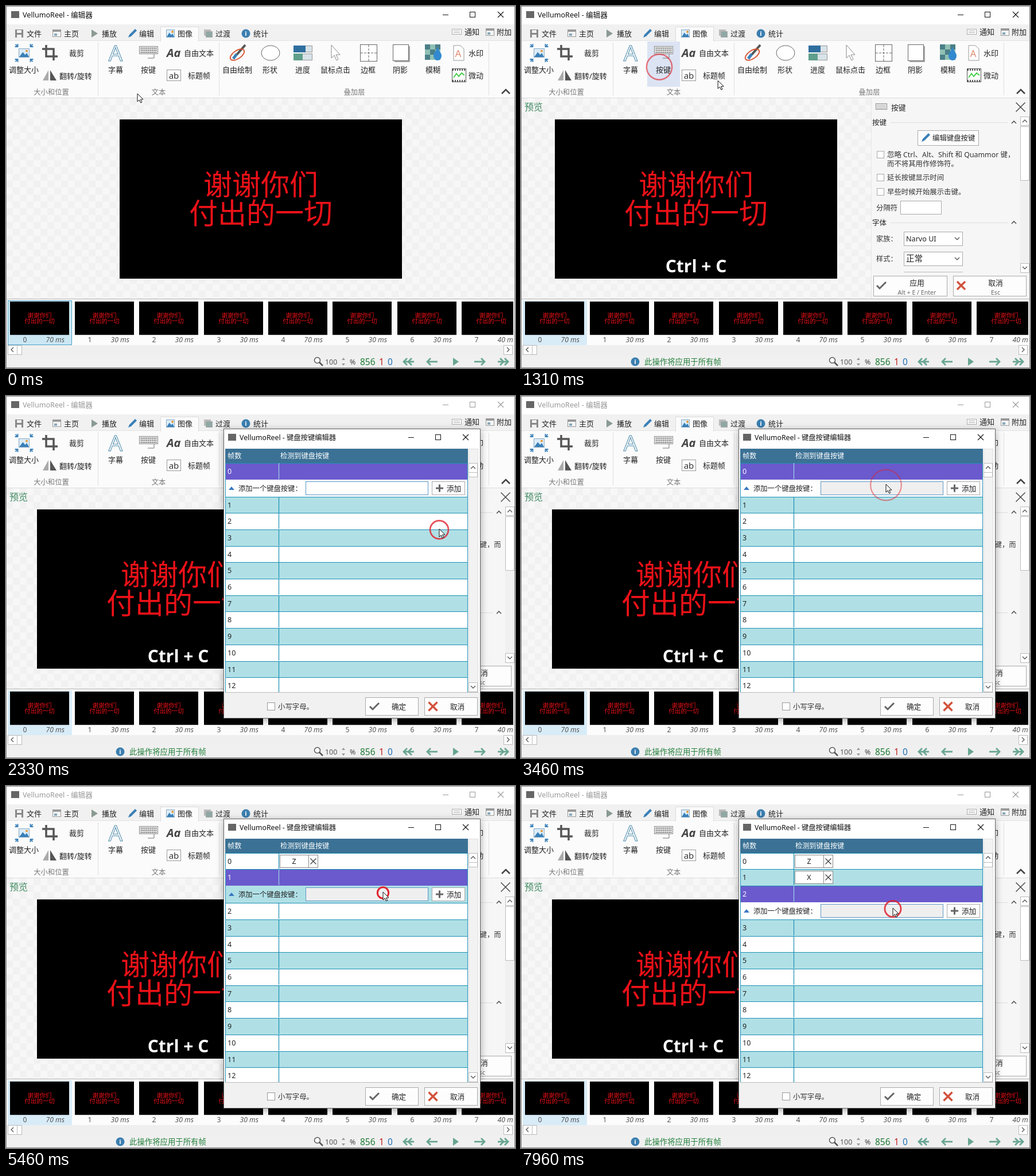
An HTML page with a canvas that plays this animation: 887x632 px, repeating every 8 s.

```html
<!DOCTYPE html>
<html lang="zh-CN">
<head>
<meta charset="utf-8">
<style>
html, body { margin: 0; width: 100%; height: 100%; overflow: hidden; background: #fff; }
canvas { display: block; width: 100%; height: 100%; }
</style>
</head>
<body>
<canvas id="stage" width="887" height="632"></canvas>
<script>
const screenCtx = document.getElementById('stage').getContext('2d');
const layer = document.createElement('canvas');
layer.width = 887; layer.height = 632;
const layerCtx = layer.getContext('2d');
let ctx = screenCtx;

const FONT = '"Noto Sans","Noto Sans CJK SC","Noto Sans CJK",sans-serif';
const APP = 'VellumoReel';
const LOOP = 8000, TEAL = '#68a592', BLUE = '#3a80b8', GREY = '#777';
const clamp = p => Math.max(0, Math.min(1, p));
const smooth = p => p * p * (3 - 2 * p);

// drawing helpers: text is placed by its vertical centre
function text(s, x, y, size = 12.8, color = '#222', align = 'left', style = '') {
  ctx.font = `${style} ${size}px ${FONT}`;
  ctx.fillStyle = color;
  ctx.textAlign = align;
  ctx.fillText(s, x, y + size * 0.37);
}
const label = (s, x, y, size, color, style) => text(s, x, y, size, color, 'center', style);
function box(x, y, w, h, fill, stroke, lw = 1) {
  if (fill) { ctx.fillStyle = fill; ctx.fillRect(x, y, w, h); }
  if (stroke) { ctx.strokeStyle = stroke; ctx.lineWidth = lw; ctx.strokeRect(x + .5, y + .5, w - 1, h - 1); }
}
function path(points, color, lw = 1, fill) {
  ctx.beginPath();
  for (let i = 0; i < points.length; i += 2) ctx.lineTo(points[i], points[i + 1]);
  if (fill) { ctx.closePath(); ctx.fillStyle = fill; ctx.fill(); }
  if (color) { ctx.strokeStyle = color; ctx.lineWidth = lw; ctx.stroke(); }
}
function oval(x, y, rx, ry, fill, stroke, lw = 1) {
  ctx.beginPath();
  ctx.ellipse(x, y, rx, ry, 0, 0, 7);
  if (fill) { ctx.fillStyle = fill; ctx.fill(); }
  if (stroke) { ctx.strokeStyle = stroke; ctx.lineWidth = lw; ctx.stroke(); }
}
function clipped(x, y, w, h, draw) {
  ctx.save();
  ctx.beginPath(); ctx.rect(x, y, w, h); ctx.clip();
  draw();
  ctx.restore();
}
function cross(x, y, r, color, lw = 1.2) {
  path([x - r, y - r, x + r, y + r], color, lw);
  path([x + r, y - r, x - r, y + r], color, lw);
}
const chevron = (x, y, dx, dy, color = '#555', lw = 1.3) =>
  path(dx ? [x - dx, y - 4, x + dx, y, x - dx, y + 4] : [x - 4, y - dy, x, y + dy, x + 4, y - dy], color, lw);
const tick = (x, y) => path([x - 8, y, x - 3, y + 5, x + 8, y - 6], '#666', 3);
const pencil = (x, y) => {
  path([x - 7, y + 7, x - 5, y + 2, x + 5, y - 8, x + 8, y - 5, x - 2, y + 5], null, 0, BLUE);
};
function info(x, y) {
  oval(x, y, 7.5, 7.5, '#3c7fb0');
  text('i', x, y, 11, '#fff', 'center', 'bold');
}
function picture(x, y, w, h) {
  box(x, y, w, h, '#dcecf8', '#88a9c4');
  path([x + 1, y + h - 1, x + w * .38, y + h * .4, x + w * .6, y + h * .7, x + w * .75, y + h * .5, x + w - 1, y + h - 1], null, 0, BLUE);
  oval(x + w * .74, y + h * .28, 2, 2, '#e59a35');
}
function frameIcon(x, y) {
  box(x - 7, y - 7, 15, 13, '#f4f4f4', '#999');
  box(x - 7, y - 7, 15, 4, '#999');
  box(x - 4, y, 5, 4, '#8ab');
}
function keyboard(x, y, w, h) {
  box(x, y, w, h, '#f6f6f6', '#888');
  const n = w > 25 ? 9 : 7, step = (w - 4) / n;
  for (let r = 0; r < 3; r++)
    for (let i = 0; i < n; i++) box(x + 2.5 + i * step, y + 2.5 + r * (h - 3) / 3, step - 1, (h - 6) / 3 - .5, '#777');
}
function windowButtons(xs, y, color) {
  path([xs[0] - 5, y + .5, xs[0] + 5, y + .5], color);
  box(xs[1] - 5, y - 5, 10, 10, null, color);
  cross(xs[2], y, 5, color, 1.1);
}
function scrollBox(x, y, w, h) { box(x, y, w, h, '#fff', '#bbb'); }
function slide(x, y, w) {
  const k = w / 492;
  box(x, y, w, 278 * k, '#000');
  label('谢谢你们', x + 246 * k, y + 113.5 * k, 50 * k, '#ec1118', '500');
  label('付出的一切', x + 246 * k, y + 163.5 * k, 50 * k, '#ec1118', '500');
}

// timeline
const moves = [ // start, end, x, y
  [0, 0, 229, 153], [250, 520, 241, 105], [1115, 1800, 755, 232], [2430, 2830, 636, 154],
  [3970, 4280, 771, 159], [4700, 4980, 657, 185], [6090, 6350, 771, 186], [6800, 7300, 648, 213]];
const clicks = [ // press, release
  [770, 890], [2000, 2110], [2830, 2890], [4450, 4570], [5040, 5080], [5360, 5440], [6600, 6700], [7680, 7800]];

function pointer(t) {
  let [, , x, y] = moves[0];
  for (const [from, to, nx, ny] of moves.slice(1)) {
    const p = smooth(clamp((t - from) / (to - from)));
    x += (nx - x) * p;
    y += (ny - y) * p;
  }
  return { x, y };
}

function drawRing(t) {
  const click = clicks.filter(c => c[0] <= t).pop();
  if (!click) return;
  const p = Math.max(0, (t - click[1]) / 800);
  if (p >= 1) return;
  const at = pointer(click[0]);
  ctx.globalAlpha = 1 - .75 * p;
  oval(at.x, at.y + 1.5, 9 + 25 * p, 9 + 25 * p, null, '#e0202a', 3 - p);
  ctx.globalAlpha = 1;
}
function drawPointer({ x, y }) {
  path([x, y, x, y + 14, x + 3.3, y + 11, x + 5.6, y + 16, x + 7.8, y + 15, x + 5.6, y + 10.2, x + 10, y + 10, x, y], '#111', 1, '#fff');
}

function drawTabs(active) {
  box(0, 0, 887, 32, '#fff');
  box(9, 9, 14, 12, '#666');
  text(APP + ' - 编辑器', 29, 15.5, 12.6, active ? '#111' : '#999');
  windowButtons([766, 813, 862], 15, active ? '#111' : '#999');
  box(0, 32, 887, 29, '#f1f1f1');
  box(0, 60, 887, 101, '#fbfbfb');
  path([0, 60.5, 887, 60.5], '#e2e2e2');
  box(269, 36, 67, 26, '#fbfbfb', '#dcdcdc');
  box(270, 58, 65, 6, '#fbfbfb');
  [['文件', 36], ['主页', 101], ['播放', 167], ['编辑', 232], ['图像', 299], ['过渡', 365], ['统计', 431], ['通知', 799]]
    .forEach(([s, x]) => text(s, x, x > 700 ? 45 : 48, 13));
  text('附加', 855, 45, 13);
  box(16, 41, 14, 14, '#888'); box(19, 42, 8, 5, '#f1f1f1'); box(19, 50, 8, 5, '#f1f1f1');
  frameIcon(88, 48);
  path([149, 41, 160, 48, 149, 55], null, 0, '#8a9a92');
  pencil(220, 48);
  picture(279, 41, 15, 14);
  box(345, 41, 12, 11, '#bbb'); box(348, 44, 12, 11, '#8fa8a4', '#aaa');
  info(418, 48);
  box(777, 40, 17, 10, '#fff', '#aaa'); path([780, 43.5, 791, 43.5], '#aaa'); path([780, 46.5, 791, 46.5], '#aaa');
  frameIcon(843, 46);
}

function drawRibbon(t) {
  if (t > 420 && t < 1330) box(220, 62, 57, 79, '#dce4f3');
  for (const x of [160, 371, 841]) path([x + .5, 64, x + .5, 156], '#dfdfdf');
  path([0, 160.5, 887, 160.5], '#dcdcdc');
  [['调整大小', 31], ['字幕', 191], ['按键', 248], ['自由绘制', 403], ['形状', 460], ['进度', 517],
   ['鼠标点击', 574], ['边框', 631], ['阴影', 687], ['模糊', 744]].forEach(([s, x]) => label(s, x, 111.5, 13));
  [['裁剪', 110, 82], ['翻转/旋转', 93, 122], ['自由文本', 310, 82], ['标题帧', 317, 121], ['水印', 806, 82], ['微动', 806, 121]]
    .forEach(([s, x, y]) => text(s, x, y, 13));
  label('大小和位置', 79, 150, 12.3, GREY);
  label('文本', 266, 150, 12.3, GREY);
  label('叠加层', 607, 150, 12.3, GREY);
  path([864, 153, 871, 146, 878, 153], '#444', 2.5);

  picture(22, 74, 19, 16);
  for (const sx of [-1, 1]) for (const sy of [-1, 1]) {
    const x = 31.5 + sx * 11, y = 82 + sy * 11;
    path([x + sx * 4, y + sy * 4, x, y], BLUE, 2);
    path([x, y + sy * 5, x, y, x + sx * 5, y], BLUE, 1.8);
  }
  path([70, 68, 70, 88, 90, 88], '#555', 3.5);
  path([63, 75, 83, 75, 83, 95], '#555', 3.5);
  path([74, 112, 74, 130, 64, 130], null, 0, '#aaa');
  path([77, 112, 77, 130, 88, 130], null, 0, '#555');
  ctx.font = `38px ${FONT}`; ctx.textAlign = 'center';
  ctx.strokeStyle = '#4a8aab'; ctx.lineWidth = 1; ctx.strokeText('A', 191, 96);
  keyboard(232, 70, 33, 14); path([258, 84, 258, 91, 247, 91], '#777');
  text('Aa', 280, 82, 20, '#444', 'left', 'italic bold');
  box(280, 111, 25, 20, '#fff', '#999'); label('ab', 292.5, 121, 15, '#333');
  path([417, 68, 402, 85], '#555', 4); path([402, 84, 396, 92], BLUE, 5);
  ctx.save(); ctx.translate(403, 85); ctx.rotate(-.6); oval(0, 0, 14, 7, null, '#d65a3a', 2); ctx.restore();
  oval(461, 82, 16, 13, '#fff', '#666');
  box(501, 69, 33, 12, '#d8e3e9', '#999'); box(501, 69, 21, 12, '#2f6f9f');
  box(501, 83, 33, 12, '#d8e3e9', '#999'); box(501, 83, 16, 12, '#5f9f8c');
  path([567, 68, 567, 91, 572, 86, 576, 95, 579, 93, 575, 85, 582, 85, 567, 68], '#888', 1, '#fff');
  box(617, 67, 30, 30, '#fff', '#666');
  ctx.setLineDash([4, 2]);
  path([632, 68, 632, 96], '#666'); path([618, 82, 646, 82], '#666');
  ctx.setLineDash([]);
  box(677, 70, 27, 28, '#aaa'); box(674, 67, 28, 29, '#fff', '#666');
  for (let i = 0; i < 9; i++) box(730 + i % 3 * 9, 67 + Math.floor(i / 3) * 9, 9, 9, i % 2 ? '#8fc0b4' : '#4b7f88');
  oval(752, 87, 7, 8, '#3289cf'); path([746, 84, 752, 72, 758, 84], null, 0, '#3289cf');
  path([780, 69, 792, 69, 798, 75, 798, 95, 780, 95, 780, 69], '#999', 1, '#fff');
  label('A', 788, 83, 17, '#df8a70');
  box(777, 109, 25, 24, '#fff', '#555');
  for (let x = 778; x < 801; x += 4) { box(x, 110, 2, 3, '#555'); box(x, 129, 2, 3, '#555'); }
  path([780, 125, 785, 118, 789, 123, 794, 117, 799, 121], '#4ccf50', 2);
}

function drawCanvasArea(left, open) {
  box(0, 161, 887, 351, '#f7f7f7');
  ctx.fillStyle = '#f1f1f1';
  for (let r = 0; r < 30; r++)
    for (let c = r % 2; c < 74; c += 2) ctx.fillRect(c * 12, 161 + r * 12, 12, 12);
  const x = Math.round(left / 2 - 246);
  slide(x, 198, 492);
  if (open) {
    text('预览', 6, 176, 16, '#3f8a62');
    ctx.font = 'bold 30px "Open Sans","Noto Sans",sans-serif';
    ctx.textAlign = 'center'; ctx.fillStyle = '#fff';
    ctx.fillText('Ctrl + C', x + 246, 465);
  }
}

function drawPanel(L, hover) {
  box(L, 161, 887 - L, 351, '#f6f6f6');
  path([L + .5, 161, L + .5, 511], '#ddd');
  keyboard(L + 8, 170, 20, 11);
  text('按键', L + 35, 177, 12.8);
  cross(870.5, 176.5, 8, '#444', 1.4);
  const section = (s, y) => {
    text(s, L + 2, y, 12.5);
    path([L + 34, y + .5, 848, y + .5], '#ddd');
    chevron(859, y, 0, -2, '#555', 1.6);
  };
  const check = (s, y) => {
    box(L + 10, y - 6, 13, 13, '#fff', '#aaa');
    text(s, L + 28, y, 12.4, '#333');
  };
  const combo = (name, value, y, size) => {
    text(name, L + 9, y, 12.2, '#333');
    box(L + 57, y - 12, 103, 25, '#fff', '#aaa');
    text(value, L + 61, y, size);
    chevron(L + 150, y, 0, 2);
  };
  section('按键', 203);
  const mid = Math.round((L + 878) / 2);
  box(mid - 53, 217, 107, 27, hover ? '#dbecf8' : '#fdfdfd', hover ? '#8fb9da' : '#aaa');
  pencil(mid - 39, 230);
  text('编辑键盘按键', mid - 27, 230.5, 12.4);
  const wide = L < 605;
  check('忽略 Ctrl、Alt、Shift 和 Quammor 键，' + (wide ? '而' : ''), 259);
  text((wide ? '' : '而') + '不将其用作修饰符。', L + 28, 275, 12.4, '#333');
  check('延长按键显示时间', 299);
  check('早些时候开始展示击键。', 324);
  text('分隔符', L + 9, 352, 12.4, '#333');
  box(L + 51, 340, 72, 24, '#fff', '#aaa');
  section('字体', 378);
  combo('家族：', 'Narvo UI', 406, 12.6);
  combo('样式：', '正常', 441, 14.5);
  path([L + 57, 464.5, L + 160, 464.5], '#bbb');
  box(870, 193, 16, 273, '#f0f0f0');
  scrollBox(870, 193, 16, 16); chevron(878, 201, 0, -2);
  scrollBox(870, 210, 16, 95);
  scrollBox(870, 449, 16, 17); chevron(878, 457, 0, 2);
  const end = Math.round((L + 876) / 2), next = end + 10;
  box(L + 4, 471, end - L - 4, 36, '#fdfdfd', '#aaa');
  tick(L + 18, 488);
  label('应用', L + 80, 483, 12.8);
  label('Alt + E / Enter', L + 80, 500, 10.6, '#666');
  box(next, 471, 881 - next, 36, '#fdfdfd', '#aaa');
  cross(next + 14, 488, 7, '#d2513b', 3.2);
  label('取消', 827, 483, 12.8);
  label('Esc', 827, 500, 10.6, '#666');
}

function drawBottom(open) {
  box(0, 511, 887, 121, '#f0f0f0');
  box(0, 512, 887, 80, '#fcfcfc');
  path([0, 511.5, 887, 511.5], '#b5b5b5');
  box(3, 514, 112, 78, open ? '#d8ecf8' : '#cbe7f4', open ? null : '#4aa3c8');
  clipped(0, 512, 884, 80, () => {
    [70, 30, 30, 30, 70, 30, 30, 40].forEach((ms, i) => {
      const x = 7 + Math.ceil(112.4 * i);
      slide(x, 516, 103);
      label(i, x + 26, 582.5, 12.2, '#555');
      text(ms + ' ms', x + 95, 582.5, 12.2, '#555', 'right', 'italic');
    });
  });
  box(3, 592, 880, 17, '#efefef');
  scrollBox(3, 592, 17, 17); chevron(11, 600, -2, 0);
  scrollBox(19, 592, 9, 17);
  scrollBox(867, 592, 16, 17); chevron(875, 600, 2, 0);
  if (open) {
    info(199, 621);
    text('此操作将应用于所有帧', 215, 621, 13.4, '#24803c');
  }
  oval(542.5, 618.5, 5, 5, '#fff', '#555', 1.5);
  path([546, 622, 552, 628], '#555', 2.5);
  text('100', 556, 621.5, 12.4, '#555');
  path([585, 618, 588, 614, 591, 618], null, 0, '#999');
  path([585, 624, 588, 628, 591, 624], null, 0, '#999');
  text('%', 599, 621, 12.4, '#444');
  text('856', 617, 621, 15.5, '#1f7a35');
  text('1', 650, 621, 15.5, '#c02020');
  text('0', 665, 621, 15.5, '#1f6fb5');
  // d: direction, heads: one for a step, two for a jump to the end
  const arrow = (x, d, heads) => {
    for (let i = 0; i < heads; i++) {
      const tip = x + d * (9 - 8 * i);
      path([tip - d * 6, 615, tip, 621, tip - d * 6, 627], TEAL, 2.8);
    }
    path([x - d * 9, 621, x + d * 8, 621], TEAL, 2.8);
  };
  arrow(702, -1, 2); arrow(743, -1, 1);
  path([779, 614, 789, 621, 779, 628], null, 0, TEAL);
  arrow(825, 1, 1); arrow(866, 1, 2);
}

function drawDialog(t, at, rowEnd) {
  const selected = t < 5100 ? 0 : t < 7720 ? 1 : 2;
  const tags = [t >= 4570 && 'Z', t >= 6700 && 'X'];
  const typed = t >= 3690 && t < 4570 ? 'Z' : t >= 6080 && t < 6700 ? 'X' : '';
  const LINE = '#1c8fb4';
  ctx.shadowColor = 'rgba(0,0,0,.35)'; ctx.shadowBlur = 12; ctx.shadowOffsetY = 3;
  box(379, 57, 448, 506, '#f1f1f1');
  ctx.shadowColor = 'transparent';
  box(379, 57, 448, 460, '#fff');
  box(379, 57, 448, 506, null, '#666');
  box(387, 66, 14, 12, '#666');
  text(APP + ' - 键盘按键编辑器', 407, 72.5, 12.3, '#111');
  windowButtons([706, 753, 801], 72, '#111');

  box(382, 92, 423, 25, '#3b7194');
  text('帧数', 386, 104, 12.2, '#fff');
  clipped(476, 92, rowEnd - 476, 25, () => text('检测到键盘按键', 478, 104, 12.2, '#fff'));
  clipped(382, 116, 423, 402, () => {
    for (let i = 0; i < 13; i++) {
      const y = Math.round(116.5 + 28.7 * i + (i > selected ? 30.3 : 0));
      const tint = i % 2 ? '#b0e0e6' : '#fff', on = i === selected;
      box(382, y, 423, on ? 59 : 29, tint);
      if (on) box(382, y, rowEnd - 382, 29, '#6a5acd');
      path([382, y + .5, 805, y + .5], LINE);
      path([475.5, y, 475.5, y + 28], on ? '#9fd0ea' : LINE, 1.2);
      text(i, 386, y + 14.5, 12.6, on ? '#fff' : '#222');
      if (tags[i]) {
        box(477, y + 3, 67, 23, '#fff', '#888');
        label(tags[i], 502, y + 14.5, 12.4);
        path([527.5, y + 3, 527.5, y + 26], '#888');
        cross(535.5, y + 14.5, 5, '#333', 1.1);
      }
      if (on) {
        const c = y + 44, near = Math.abs(at.y - c) < 13;
        const overField = near && at.x > 522 && at.x < 736, overAdd = near && at.x > 742 && at.x < 800;
        path([388, c + 3, 393, c - 3, 398, c + 3], null, 0, '#3a78c0');
        text('添加一个键盘按键：', 405, c, 12.3);
        box(522, c - 12, 214, 24, overField ? '#efefef' : '#fff', '#5c97c4');
        label(typed, 629, c, 12.4);
        box(742, c - 12, 58, 24, overAdd ? '#cfe3ee' : '#fdfdfd', overAdd ? '#b5d2e4' : '#aaa');
        path([749, c, 762, c], '#666', 3); path([755.5, c - 6.5, 755.5, c + 6.5], '#666', 3);
        text('添加', 768, c, 12.6);
      }
    }
    if (rowEnd < 805) path([rowEnd + .5, 117, rowEnd + .5, 517], LINE);
  });
  path([382.5, 117, 382.5, 517], LINE);
  path([804.5, 117, 804.5, 517], LINE);
  path([382, 517.5, 823, 517.5], '#bbb');
  box(806, 92, 17, 425, '#f2f2f2', '#ddd');
  scrollBox(806, 117, 16, 17); chevron(814, 125, 0, -2);
  scrollBox(806, 133, 16, 9);
  scrollBox(806, 500, 16, 17); chevron(814, 508, 0, 2);

  box(455, 535, 14, 14, '#fff', '#999');
  text('小写字母。', 474, 542, 12.4, '#333');
  box(626, 526, 93, 32, '#fdfdfd', '#aaa');
  tick(642, 542); text('确定', 672, 542, 12.6);
  box(729, 526, 93, 32, '#fdfdfd', '#aaa');
  cross(744, 542, 7.5, '#d2513b', 3.4); text('取消', 774, 542, 12.6);
}

// the dialog is painted on its own layer, so that it fades as one piece
function showDialog(t, at) {
  const p = clamp((t - 2060) / 190), k = .95 + .05 * p;
  ctx = layerCtx;
  ctx.clearRect(0, 0, 887, 632);
  drawDialog(t, at, p < 1 ? 497 : 805);
  ctx = screenCtx;
  ctx.save();
  ctx.globalAlpha = p;
  ctx.translate(602.5, 309.5); ctx.scale(k, k); ctx.translate(-602.5, -309.5);
  ctx.drawImage(layer, 0, 0);
  ctx.restore();
}

function draw(t) {
  const at = pointer(t);
  const rest = 1 - clamp((t - 890) / 520);
  const left = 600 + 287 * rest * rest;
  const open = t >= 890, dialog = t >= 2060;
  drawTabs(!dialog);
  drawRibbon(t);
  drawCanvasArea(left, open);
  if (open) clipped(left, 161, 887 - left, 351, () => drawPanel(Math.round(left), t > 1680 && t < 2300));
  drawBottom(open);
  box(0, 0, 887, 632, null, '#8a8a8a');
  if (dialog) showDialog(t, at);
  drawRing(t);
  drawPointer(at);
}

const begin = performance.now();
function tickFrame() {
  draw((performance.now() - begin) % LOOP);
  requestAnimationFrame(tickFrame);
}
tickFrame();
</script>
</body>
</html>
```
